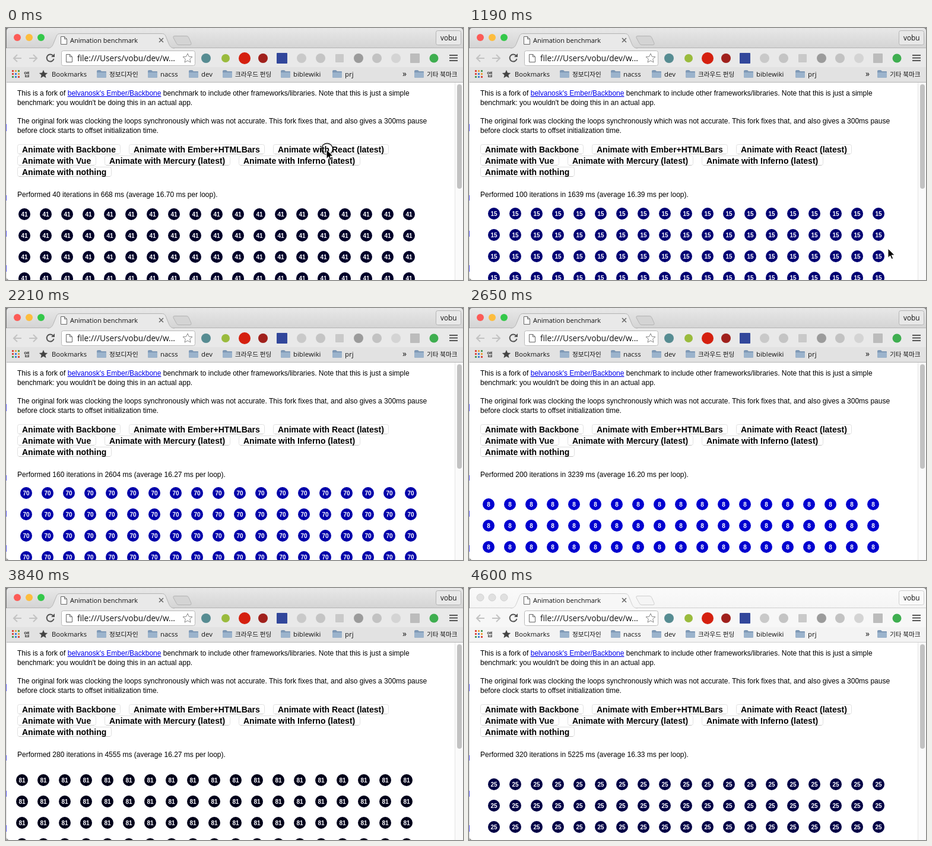
Animation, 770 px wide and 425 px high, one loop 4.7 s. Source, as an HTML page:

```html
<!DOCTYPE html>
<html lang="en">
<head>
<meta charset="utf-8">
<title>Animation benchmark</title>
<style>
  html, body { margin: 0; width: 100%; height: 100%; overflow: hidden; background: #777; }
  svg { display: block; width: 770px; height: 425px; }
  .ui { font: 11.4px "Open Sans", "Noto Sans CJK KR", "Noto Sans CJK", sans-serif; fill: #111; }
  .page { font: 12px "Liberation Sans", Arial, sans-serif; fill: #000; }
  .link { fill: #0000ee; text-decoration: underline; }
  .button { font: bold 14px "Liberation Sans", Arial, sans-serif; }
  .count { font: bold 10px "Liberation Sans", Arial, sans-serif; fill: #fff; text-anchor: middle; }
  .line { fill: none; stroke-width: 2; }
  .frame { --top: #e8e8e8; --low: #d4d4d4; --bar: #e9e9e9; --marks: #e2e2e2; --border: #b4b4b4; }
  .inactive { --top: #fafafa; --low: #f5f5f5; --bar: #f7f7f7; --marks: #f3f3f3; --border: #cfcfcf; }
  .inactive .light { fill: #e0e0e0; stroke: #d0d0d0; }
</style>
</head>
<body>
<svg id="window" class="frame" viewBox="0 0 770 425">
  <defs>
    <linearGradient id="titlebar" x2="0" y2="1">
      <stop style="stop-color:var(--top)"/><stop offset="1" style="stop-color:var(--low)"/>
    </linearGradient>
    <path id="folder" d="M0 2q0-2 2-2h4l2 2h7q1 0 1 1v8q0 2-2 2H2q-2 0-2-2z" fill="#7f99b6"/>
    <path id="folderFront" d="M0 4h16v7q0 2-2 2H2q-2 0-2-2z" fill="#9bb3cc"/>
    <path id="star" d="M0-8 2.3-2.8 8-2.3 3.7 1.4 5 7 0 4-5 7-3.7 1.4-8-2.3-2.3-2.8z"/>
    <path id="sheet" d="M.5.5h6l4 4v9H.5zM6.5.5v4h4" fill="#fff" stroke="#666"/>
    <g id="dot"><circle id="disc" r="10"/><text id="number" class="count" y="3.5"></text></g>
  </defs>

  <path d="M0 34h1v391H0z" fill="#ddd"/>
  <path d="M.5 162v12m0 108v9m0 51v10m0 48v11" stroke="#55e"/>

  <path d="M1 34V5q0-5 5-5h759q5 0 5 5v29z" fill="url(#titlebar)"/>
  <path d="M1 34h769v58H1z" style="fill:var(--bar)"/>
  <path d="M1 66h769v25H1z" style="fill:var(--marks)"/>
  <path d="M1 33.5h73M280 33.5h490M1 91.5h769" style="stroke:var(--border)"/>
  <path d="M70 34c6 0 8-3 10-8l4-10c2-5 3-6.5 8-6.5h170c5 0 6 1.5 8 6.5l4 10c2 5 4 8 10 8" style="fill:var(--bar);stroke:var(--border)"/>
  <path d="M284 13.5h20q3 0 4 3l4 9q1 3-2 3h-19q-3 0-4-3l-5-9q-1-3 2-3z" style="fill:var(--low);stroke:var(--border)"/>
  <circle class="light" cx="19" cy="16" r="6" fill="#fc5b57"/>
  <circle class="light" cx="39" cy="16" r="6" fill="#fdbd3e"/>
  <circle class="light" cx="59" cy="16" r="6" fill="#34c84a"/>
  <use href="#sheet" x="92" y="14"/>
  <path d="m258 17 7 7m0-7-7 7" class="line" stroke="#666" style="stroke-width:1.5"/>
  <rect x="724.5" y="4.5" width="42" height="24" rx="3" style="fill:var(--top);stroke:var(--border)"/>

  <path d="M26 51H13m6-6-6 6 6 6M39 51h13m-6-6 6 6-6 6" class="line" stroke="#c3c3c3"/>
  <path d="M79.5 47a6 6 0 1 0 1 5" class="line" stroke="#555"/>
  <path d="M82 43v6h-6z" fill="#555"/>
  <rect x="93.5" y="38.5" width="225" height="25" rx="3" fill="#fff" stroke="#b9b9b9"/>
  <use href="#sheet" x="101" y="44"/>
  <use href="#star" x="306" y="51" fill="none" stroke="#888"/>
  <path d="M747 46h14m-14 4.5h14m-14 4.5h14" class="line" stroke="#555"/>
  <use href="#star" transform="translate(63 78) scale(.9)" fill="#444"/>
  <g id="icons"></g>
  <g id="labels" class="ui"></g>

  <path d="M1 92h769v328q0 5-5 5H6q-5 0-5-5z" fill="#fff"/>
  <path d="M757 92h13v333h-13z" fill="#fafafa"/>
  <path d="M756.5 92v333" stroke="#e4e4e4"/>
  <rect x="760" y="95" width="8" height="176" rx="4" fill="#c2c2c2"/>

  <g class="page">
    <text x="19" y="114">This is a fork of <tspan class="link">belvanosk's Ember/Backbone</tspan> benchmark to include other frameworks/libraries. Note that this is just a simple</text>
    <text x="19" y="130">benchmark: you wouldn't be doing this in an actual app.</text>
    <text x="19" y="161">The original fork was clocking the loops synchronously which was not accurate. This fork fixes that, and also gives a 300ms pause</text>
    <text x="19" y="177">before clock starts to offset initialization time.</text>
    <g id="buttons"></g>
    <text id="report" x="19" y="285"></text>
  </g>
  <g id="dots"></g>
  <circle id="ring" cx="541" cy="204" r="9.5" fill="none" stroke="#222" stroke-width="1.3"/>
  <path id="cursor" d="M0 0v15.5l3.6-3.4 2.5 5.6 2.5-1.1-2.5-5.5h5z" fill="#000" stroke="#fff"/>
</svg>

<script>
const LOOP = 4700;
const el = id => document.getElementById(id);
const label = (x, y, text, size = 11.4) => `<text x="${x}" y="${y}" style="font-size:${size}px">${text}</text>`;

// Toolbar extensions: x, radius, colour, square?
el("icons").innerHTML = [
  [337, 8, "#568c92"], [370, 7, "#9abb3d"], [402, 10, "#d5200f"], [433, 8, "#a0201c"],
  [465, 9, "#32479b", 1], [498, 8, "#c9c9c9"], [530, 8, "#c4c4c4"], [562, 7, "#c9c9c9", 1],
  [594, 8, "#9b9b9b"], [625, 8, "#c2c2c2"], [657, 8, "#d4d4d4"], [689, 8, "#bcbcbc", 1], [721, 7.5, "#3fae50"]
].map(([x, r, fill, square]) =>
  `<rect x="${x - r}" y="${51 - r}" width="${2 * r}" height="${2 * r}" rx="${square ? 1 : r}" fill="${fill}"/>`
).join("");

["#d8453a", "#e8a33a", "#4a9a57", "#d8453a", "#3f7fd0", "#e8a33a", "#4a9a57", "#3f7fd0", "#d8453a"]
  .forEach((fill, i) => el("icons").innerHTML +=
    `<rect x="${10 + i % 3 * 5}" y="${71 + (i / 3 | 0) * 5}" width="3" height="3" fill="${fill}"/>`);

const folder = (x, text, size) =>
  `<use href="#folder" x="${x}" y="71"/><use href="#folderFront" x="${x}" y="71"/>` + label(x + 21, 82, text, size);

el("labels").innerHTML =
  label(108, 25, "Animation benchmark", 11) + label(732, 21, "vobu", 11.8) +
  label(120, 56, "file:///Users/vobu/dev/w...", 13.7) +
  label(30, 82, "앱", 10.6) + label(77, 82, "Bookmarks", 11.2) + label(668, 82, "»", 14) +
  folder(153, "정보디자인", 10.6) + folder(239, "nacss") + folder(308, "dev") +
  folder(365, "크라우드 펀딩", 10.6) + folder(463, "biblewiki") + folder(550, "prj") +
  folder(688, "기타 북마크", 10.6);

const pen = document.createElement("canvas").getContext("2d");
pen.font = 'bold 14px "Liberation Sans", Arial, sans-serif';
el("buttons").innerHTML = [
  ["Backbone", "Ember+HTMLBars", "React (latest)"],
  ["Vue", "Mercury (latest)", "Inferno (latest)"],
  ["nothing"]
].map((names, row) => {
  let x = 19;
  return names.map(name => {
    const text = "Animate with " + name, width = Math.ceil(pen.measureText(text).width) + 16;
    const y = 196.5 + row * 19, left = x;
    x += width + 14;
    return `<rect x="${left + .5}" y="${y}" width="${width - 1}" height="16" rx="3" fill="#fff" stroke="#e0e0e0"/>
      <path d="M${left + 3} ${y + 16}h${width - 6}" stroke="#c4c4c4"/>
      <text class="button" x="${left + 8}" y="${y + 13.5}">${text}</text>`;
  }).join("");
}).join("");

for (let i = 0; i < 76; i++)
  el("dots").innerHTML += `<use href="#dot" x="${37 + i % 19 * 36}" y="${322 + (i / 19 | 0) * 36}"/>`;

// Piecewise linear lookup in rows of [key, value]
function lookup(rows, key, column = 1) {
  let i = 1;
  while (i < rows.length - 1 && key >= rows[i][0]) i++;
  const a = rows[i - 1], b = rows[i];
  const p = Math.min(1, (key - a[0]) / (b[0] - a[0]));
  return a[column] + (b[column] - a[column]) * p;
}

const steps = [[0, 0], [150, 1], [740, 5], [1190, 8], [1340, 9], [1920, 13], [2360, 16],
  [2500, 17], [2650, 18], [3540, 24], [3690, 25], [3840, 26], [4600, 31]];
const counts = [[0, 41], [5, 87], [8, 115], [13, 161], [18, 208], [26, 281], [31, 325]];
const elapsed = [[40, 668], [80, 1302], [100, 1639], [160, 2604], [200, 3239], [280, 4555], [320, 5225]];
const pointer = [[0, 540, 205], [1, 543, 210], [5, 686, 361], [8, 706, 372], [13, 737, 419], [14, 742, 430]];

function draw(time) {
  const step = Math.floor(lookup(steps, time) + 1e-6);
  const count = Math.round(lookup(counts, step));
  const x = Math.round(Math.cos(count / 10) * 10), y = Math.round(Math.sin(count / 10) * 10);
  el("dots").setAttribute("transform", `translate(${x} ${y})`);
  el("disc").setAttribute("fill", `rgb(0,0,${count % 255})`);
  el("number").textContent = count % 100;

  const done = Math.floor(count / 20) * 20, ms = Math.round(lookup(elapsed, done));
  el("report").textContent =
    `Performed ${done} iterations in ${ms} ms (average ${(ms / done).toFixed(2)} ms per loop).`;

  el("cursor").setAttribute("transform", `translate(${lookup(pointer, step)} ${lookup(pointer, step, 2)})`);
  el("ring").style.display = step ? "none" : "";
  el("window").classList.toggle("inactive", step >= 31);
}

function tick() {
  draw(performance.now() % LOOP);
  requestAnimationFrame(tick);
}
tick();
</script>
</body>
</html>
```
